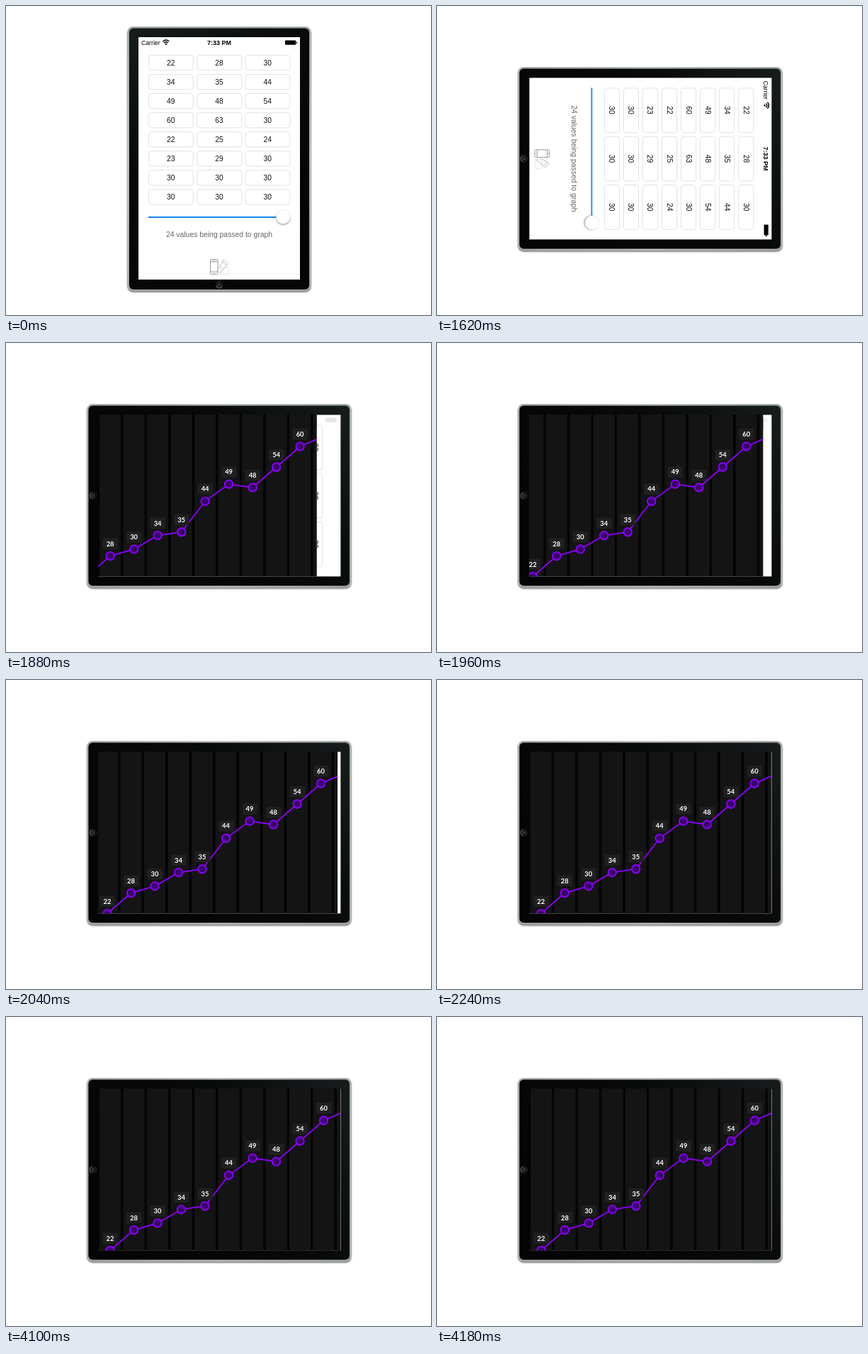
Animation of 600x436 px, one loop 4820 ms. Source, as an HTML page:

```html
<!DOCTYPE html>
<html lang="en">
<head>
<meta charset="utf-8">
<title>Rotating graph demo</title>
<style>
  html, body { margin: 0; width: 100%; height: 100%; overflow: hidden; background: #fff; }
  svg { display: block; }
  text { font-family: "Liberation Sans", Arial, sans-serif; }
  .tag { font: 700 9.4px Lato, sans-serif; fill: #fff; text-anchor: middle; }
  .cell { font-size: 10.3px; text-anchor: middle; fill: #111; }
</style>
</head>
<body>
<svg id="stage" width="600" height="436" viewBox="0 0 600 436">
  <defs>
    <linearGradient id="rim" x1="0" y1="0" x2="0" y2="1">
      <stop offset="0" stop-color="#8b918d"/><stop offset=".5" stop-color="#a9b0ab"/><stop offset="1" stop-color="#8d938f"/>
    </linearGradient>
    <linearGradient id="glass" x1="0" y1="0" x2=".5" y2="1">
      <stop offset="0" stop-color="#171c1c"/><stop offset=".45" stop-color="#080909"/><stop offset="1" stop-color="#050505"/>
    </linearGradient>
    <filter id="soft" x="-20%" y="-20%" width="140%" height="140%"><feGaussianBlur stdDeviation="1.3"/></filter>
  </defs>
  <g id="device">
    <rect id="shadow" x="171.5" y="29" width="259" height="373" rx="8" fill="#000" opacity=".55" filter="url(#soft)"/>
    <rect x="171.5" y="29" width="259" height="373" rx="8" fill="url(#rim)"/>
    <rect x="172.4" y="29.9" width="257.2" height="371.2" rx="7.2" fill="none" stroke="#d5dad6" stroke-width=".7"/>
    <rect x="174" y="31.5" width="254" height="368.5" rx="6" fill="url(#glass)"/>
    <g fill="none" stroke="#4c5050">
      <circle cx="301" cy="393.5" r="4.4" fill="#0b0b0b" stroke="#333"/>
      <path d="M296.8 395a4.4 4.4 0 0 0 8.4 0" stroke="#777"/>
      <rect x="299.5" y="392" width="3" height="3" rx=".8" stroke="#777" stroke-width=".7"/>
    </g>
    <rect x="187" y="44" width="228" height="342" fill="#fff"/>
    <g id="upright"></g>
    <g id="cells"></g>
    <path d="M201 298H391" stroke="#1482e6" stroke-width="1.8"/>
    <circle cx="391.3" cy="299" r="10" fill="#000" opacity=".4" filter="url(#soft)"/>
    <circle cx="391.3" cy="297.5" r="9.9" fill="#fff" stroke="#ddd" stroke-width=".5"/>
    <text x="301" y="326.3" font-size="10.4" fill="#666" text-anchor="middle">24 values being passed to graph</text>
    <g fill="none" stroke="#808080" stroke-width=".8">
      <rect x="302.5" y="368.5" width="12.5" height="9.5" rx="1" stroke="#ccc" stroke-dasharray="1.5 1"/>
      <path d="M300 370.5L307.5 358L313.5 363.5L301.5 377.5" stroke="#aaa"/>
      <path d="M305.5 361L311.5 366" stroke="#aaa"/>
      <rect x="288.5" y="357.5" width="10.5" height="21" rx="1.6" fill="#fff"/>
      <path d="M288.5 360.8h10.5M288.5 375h10.5M292.5 359.2h2.5M293 376.8h1.6"/>
    </g>
  </g>
  <svg x="130" y="101" width="342" height="228.5" overflow="hidden">
    <svg id="panel" width="342" height="228.5" overflow="hidden"></svg>
  </svg>
  <g id="level"></g>
</svg>
<script>
const LOOP = 4820, TURN = 1620, SETTLED = 2280, STEP = 20;
const VALUES = [22, 28, 30, 34, 35, 44, 49, 48, 54, 60, 63, 30, 22, 25, 24, 23, 29, 30, 30, 30, 30, 30, 30, 30];
const WIDTH = 342, GAP = 33.5;
const $ = id => document.getElementById(id);

function statusBar(x, y, w) {
  const cx = x + 38.8, b = y + 10.5, r = x + w;
  return `<text x="${x + 4}" y="${y + 11}" font-size="8.7">Carrier</text>
    <g fill="none" stroke="#000" stroke-width="1.4">
      <path d="M${cx - 4.5} ${b - 4.6}q4.5 -4 9 0M${cx - 2.8} ${b - 2.6}q2.8 -2.5 5.6 0"/>
      <circle cx="${cx}" cy="${b - .7}" r=".5"/>
    </g>
    <text x="${x + w / 2}" y="${y + 11}" font-size="9" font-weight="700" text-anchor="middle">7:33 PM</text>
    <rect x="${r - 21}" y="${y + 4.6}" width="15.2" height="6.2" rx="1"/>
    <rect x="${r - 5.3}" y="${y + 6.5}" width="1.2" height="2.4" rx=".5"/>`;
}

function cell(v, i) {
  const x = 201.5 + (i % 3) * 68.3, y = 69.5 + Math.floor(i / 3) * 27.05;
  return `<rect x="${x}" y="${y}" width="62.8" height="21.2" rx="3.5" fill="#fff" stroke="#e2e2e2"/>
    <text class="cell" x="${x + 31.2}" y="${y + 14.2}">${v}</text>`;
}

function graph() {
  const points = VALUES.slice(0, 11).map((v, i) => [17 + GAP * i, 45 + (60 - v) * 4.83, v]);
  const columns = points.map(([x]) => `<rect x="${x - 15}" width="30" height="229" fill="#141414"/>`);
  const dots = points.map(([x, y, v]) => `
    <rect x="${x - 10.5}" y="${y - 25}" width="21.5" height="15.5" rx="1.5" fill="#202020"/>
    <text class="tag" x="${x}" y="${y - 14}">${v}</text>
    <circle cx="${x}" cy="${y}" r="5.7" fill="#38006b" stroke="#8d00fa" stroke-width="1.9"/>`);
  const line = points.map(([x, y]) => x + ',' + y).join(' ');
  return `<rect width="342" height="229" fill="#040404"/>${columns.join('')}
    <polyline points="${line}" fill="none" stroke="#9000ff" stroke-width="1.8"/>${dots.join('')}`;
}

// Share of the slide still to go: a critically damped spring.
function remaining(t) {
  if (t >= SETTLED) return 0;
  const a = Math.max(0, t - TURN - 15) * 0.016;
  return (1 + a) * Math.exp(-a);
}

function draw(t) {
  const turned = t >= TURN, sliding = t >= TURN + STEP;
  const p = sliding ? remaining(t) : 1;
  $('device').setAttribute('transform', turned ? 'rotate(90 301 215.4)' : '');
  $('shadow').setAttribute('transform', turned ? 'translate(1.8 0)' : 'translate(0 1.8)');
  $('upright').setAttribute('opacity', sliding ? 0 : 1);
  $('level').setAttribute('opacity', sliding ? p : 0);
  $('panel').setAttribute('x', -WIDTH * p);
}

$('upright').innerHTML = statusBar(187, 44, 228);
$('level').innerHTML = statusBar(130, 101, WIDTH);
$('cells').innerHTML = VALUES.map(cell).join('');
$('panel').innerHTML = graph();

const start = performance.now();
function tick() {
  const t = (performance.now() - start) % LOOP;
  draw(Math.floor(t / STEP) * STEP);
  requestAnimationFrame(tick);
}
tick();
</script>
</body>
</html>
```
